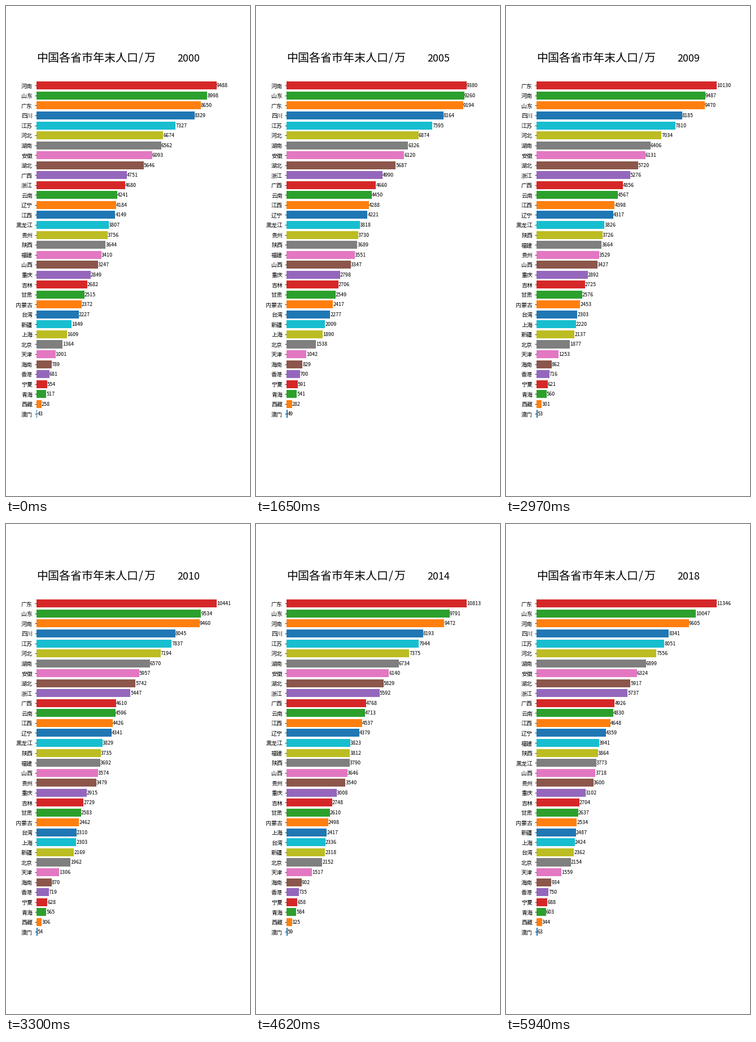
Recreate the animation shown at these times as a matplotlib script. Size 432 px wide and 864 px high, loop 6.27 s.

```python
import matplotlib.pyplot as plt
import numpy as np
from matplotlib.animation import FuncAnimation

plt.rcParams["font.family"] = "Noto Sans CJK JP"

W, H, DPI = 432, 864, 72
FIRST, LAST = 2000, 2018
LEFT, FULL = 54, 318.86          # bar origin and length of the longest bar
TOP, STEP = 140.38, 17.543       # centre of the first row, row spacing

series = {}


def grow(name, start, end, **bends):
    """Steady growth from start to end, bent only at the given years."""
    points = {FIRST: start, LAST: end}
    points.update({int(key[1:]): value for key, value in bends.items()})
    years = sorted(points)
    series[name] = np.interp(range(FIRST, LAST + 1), years,
                             [points[y] for y in years])


grow("河南", 9488, 9605, y2004=9717, y2005=9380, y2009=9487, y2012=9406)
grow("山东", 8998, 10047, y2009=9470)
grow("广东", 8650, 11346, y2005=9194, y2009=10130, y2010=10441, y2016=10999)
grow("四川", 8329, 8341, y2001=8143, y2009=8185, y2010=8045)
grow("江苏", 7327, 8051, y2009=7810)
grow("河北", 6674, 7556, y2009=7034, y2010=7194)
grow("湖南", 6562, 6899, y2004=6698, y2005=6326, y2009=6406, y2010=6570)
grow("安徽", 6093, 6324, y2004=6228, y2005=6120, y2009=6131, y2010=5957)
grow("湖北", 5646, 5917, y2009=5720)
grow("广西", 4751, 4926, y2004=4889, y2005=4660, y2009=4856, y2010=4610)
grow("浙江", 4680, 5737, y2002=4776, y2009=5276, y2010=5447)
grow("云南", 4241, 4830, y2005=4450)
grow("辽宁", 4184, 4359, y2005=4221, y2012=4389)
grow("江西", 4149, 4648)
grow("黑龙江", 3807, 3773, y2013=3835)
grow("贵州", 3756, 3600, y2004=3904, y2005=3730, y2010=3479)
grow("陕西", 3644, 3864, y2012=3753)
grow("福建", 3410, 3941, y2012=3748)
grow("山西", 3247, 3718, y2009=3427, y2010=3574)
grow("重庆", 2849, 3102, y2005=2798)
grow("吉林", 2682, 2704, y2015=2753)
grow("甘肃", 2515, 2637)
grow("内蒙古", 2372, 2534)
grow("台湾", 2227, 2362, y2005=2277)
grow("新疆", 1849, 2487, y2012=2233)
grow("上海", 1609, 2424, y2005=1890, y2010=2303, y2013=2415)
grow("北京", 1364, 2154, y2005=1538, y2010=1962, y2014=2152)
grow("天津", 1001, 1559, y2005=1042, y2014=1517)
grow("海南", 789, 934)
grow("香港", 681, 750)
grow("宁夏", 554, 688)
grow("青海", 517, 603)
grow("西藏", 258, 344)
grow("澳门", 43, 63)

fig = plt.figure(figsize=(W / DPI, H / DPI), dpi=DPI, facecolor="white")
ax = fig.add_axes([0, 0, 1, 1])
ax.axis("off")

count = len(series)
rows = TOP + STEP * np.arange(count)
colors = [f"C{(count - 1 - i) % 10}" for i in range(count)]

bars = ax.barh(rows, [0] * count, height=0.8 * STEP, left=LEFT, color=colors)
ax.hlines(rows, LEFT - 3.5, LEFT, color="black", lw=0.8, zorder=3)
ax.set_xlim(0, W)
ax.set_ylim(H, 0)


def label(x, y, text="", size=10, ha="left"):
    return ax.text(x, y, text, size=size, ha=ha, va="baseline", color="black")


# Latin digits are set a little smaller to be half as wide as the ideographs
names = [label(LEFT - 7, y + 4.3, ha="right") for y in rows]
values = [label(LEFT, y + 3, size=9) for y in rows]
label(54, 98, "中国各省市年末人口", 20)
label(235, 98, "/", 20)
label(244, 98, "万", 20)
year = label(303, 98, size=18)


def draw(i):
    ranked = sorted(series, key=lambda name: -series[name][i])
    scale = FULL / series[ranked[0]][i]
    for name, bar, tag, number in zip(ranked, bars, names, values):
        value = series[name][i]
        bar.set_width(value * scale)
        tag.set_text(name)
        number.set_text(f"{value:.0f}")
        number.set_x(LEFT + value * scale)
    year.set_text(str(FIRST + i))


anim = FuncAnimation(fig, draw, frames=LAST - FIRST + 1, interval=330,
                     repeat=True, repeat_delay=0, init_func=lambda: draw(0))
plt.show()
```
